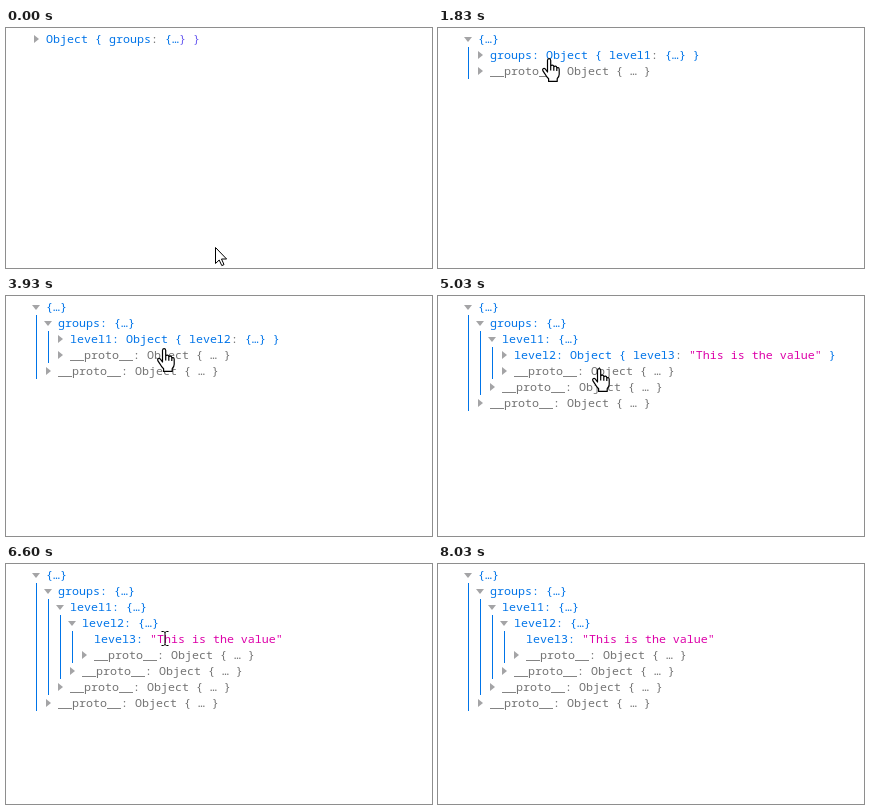
Animation, 426 px wide and 240 px high, one loop 8.71 s. Source, as an HTML page:

```html
<!DOCTYPE html>
<html lang="en">
<head>
<meta charset="utf-8">
<title>Object inspector</title>
<style>
  html, body { margin: 0; width: 100%; height: 100%; overflow: hidden; background: #fff; }
  svg { display: block; width: 426px; height: 240px; }
  text { font: 11.667px "Noto Sans Mono", "DejaVu Sans Mono", monospace; white-space: pre; }
  .blue { fill: #0074e8; }
  .violet { fill: #6a5cf0; }
  .grey { fill: #737373; }
  .pink { fill: #dd00a9; }
  .twisty { fill: #a4a4a6; }
  .cursor { fill: #fff; stroke: #000; stroke-linejoin: round; }
</style>
</head>
<body>
<svg viewBox="0 0 426 240">
  <g id="tree"></g>
  <g id="pointer">
    <path id="arrow" class="cursor" d="M.5 .5V16.5L4.2 13L6.8 18.6L9 17.6L6.5 12H11.6Z"/>
    <path id="hand" class="cursor" stroke-width="1.2" d="M.5 14V2.2Q.7 .6 2.1 .6T3.7 2.2V8.2Q4 7 5.3 7.1T6.8 8.5V9.2Q7.2 8 8.4 8.2T9.8 9.6V10.3Q10.2 9.4 11.2 9.6T12.2 11.2V16.2Q12.2 18.6 10.2 20.7V23.4H1.6V20.8Q-.6 18.7 -2.1 15.8L-4.2 12.6Q-4.8 11 -3.5 10.5T-1.2 11.6Z M3.7 8V12.5M6.8 9V12.8M9.8 10V13"/>
    <path id="beam" fill="none" stroke="#000" d="M-3.5 -6.5H-1.5L0 -5.5L1.5 -6.5H3.5M0 -5.5V6.5M-3.5 7.5H-1.5L0 6.5L1.5 7.5H3.5"/>
  </g>
</svg>
<script>
const LOOP = 8710;
const NAMES = ["", "groups", "level1", "level2", "level3"];
const VALUE = '"This is the value"';
const OPEN_TIMES = [1470, 3600, 4700, 5730];

// time, x, y of the hotspot, pointer shape from then on
const PATH = [
  [0, 209, 219, "arrow"], [30, 209, 219, "arrow"], [250, 150, 130, "arrow"],
  [480, 64, 22, "arrow"], [520, 54, 16, "hand"], [650, 36, 12, "hand"],
  [750, 44, 12, "hand"], [900, 90, 11, "hand"], [1030, 125, 11, "hand"],
  [1470, 125, 11, "hand"], [1650, 116, 24, "hand"], [1830, 109, 30, "hand"],
  [1970, 109, 30, "hand"], [2100, 133, 27, "hand"], [2330, 133, 27, "hand"],
  [2600, 167, 27, "hand"], [2780, 186, 26, "hand"], [3100, 160, 26, "hand"],
  [3600, 160, 26, "hand"], [3930, 156, 52, "hand"], [4100, 156, 52, "hand"],
  [4400, 159, 47, "hand"], [4700, 159, 47, "hand"], [5030, 159, 72, "hand"],
  [5200, 159, 72, "hand"], [5530, 160, 63, "hand"], [5730, 160, 63, "hand"],
  [5900, 160, 67, "beam"], [6300, 159, 74, "beam"], [6600, 159, 74, "beam"],
  [7000, 272, 73, "beam"], [7400, 155, 74, "beam"], [7900, 155, 74, "beam"],
  [7930, 182, 92, "arrow"], [8000, 264, 175, "arrow"], [8030, 0, 0, ""], [LOOP, 0, 0, ""]
];

const $ = id => document.getElementById(id);
const span = (color, text) => `<tspan class="${color}">${text}</tspan>`;

function row(index, depth, twisty, content) {
  const x = 30 + 12 * depth, y = 11 + 16 * index;
  const shape = {
    open: `M${x - 4} ${y - 2}h8l-4 5z`,
    closed: `M${x - 2} ${y - 4}v8l5 -4z`
  }[twisty];
  return (shape ? `<path class="twisty" d="${shape}"/>` : "") +
    `<text x="${x + 10}" y="${y + 4}">${content}</text>`;
}

function preview(level) {
  const last = level === 3;
  const end = level ? "blue" : "violet";
  return span("blue", "Object { " + NAMES[level + 1]) + span("grey", ": ") +
    (last ? span("pink", VALUE) : span("blue", "{…") + span(end, "}")) + span(end, " }");
}

function buildTree(level) {
  const label = d => d ? span("blue", NAMES[d] + ": ") : "";
  let out = "";
  for (let d = 0; d < level; d++) {
    const top = 19 + 16 * d, bottom = 19 + 32 * level - 16 * d;
    out += row(d, d, "open", label(d) + span("blue", "{…}"));
    out += `<rect class="blue" x="${30 + 12 * d}" y="${top}" width="1" height="${bottom - top}"/>`;
    out += row(2 * level - d, d + 1, "closed", span("grey", "__proto__: Object { … }"));
  }
  const leaf = level === 4;
  return out + row(level, level, leaf ? "" : "closed",
    label(level) + (leaf ? span("pink", VALUE) : preview(level)));
}

let shown = -1;

function draw(t) {
  const level = OPEN_TIMES.filter(at => t >= at).length;
  if (level !== shown) {
    $("tree").innerHTML = buildTree(level);
    shown = level;
  }
  const next = PATH.findIndex(key => key[0] > t);
  const [t0, x0, y0, shape] = PATH[next - 1];
  const [t1, x1, y1, nextShape] = PATH[next];
  const k = nextShape ? (t - t0) / (t1 - t0) : 0;
  const x = Math.round(x0 + (x1 - x0) * k), y = Math.round(y0 + (y1 - y0) * k);
  $("pointer").setAttribute("transform", `translate(${x} ${y})`);
  for (const id of ["arrow", "hand", "beam"])
    $(id).style.display = id === shape ? "" : "none";
}

const start = performance.now();
function tick() {
  draw((performance.now() - start) % LOOP);
  requestAnimationFrame(tick);
}
tick();
</script>
</body>
</html>
```
